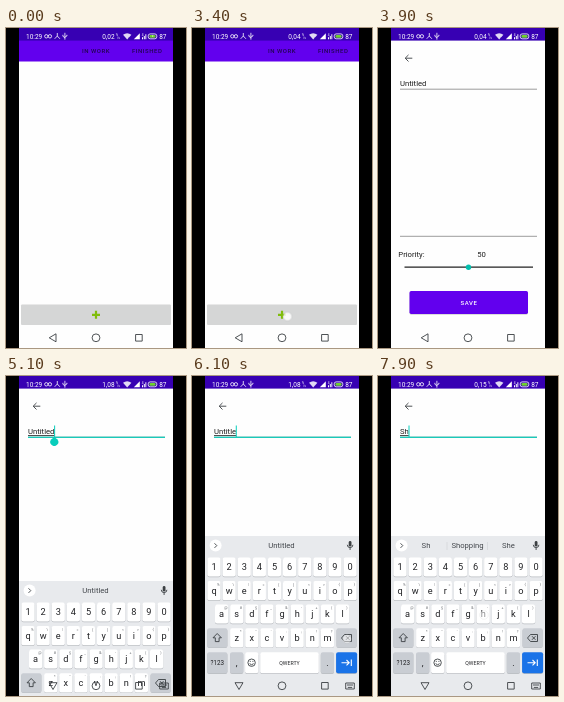
An HTML page that plays this animation: 180 px wide and 320 px high, repeating every 8000 ms.

```html
<!DOCTYPE html>
<html lang="en">
<head>
<meta charset="utf-8">
<title>To-do app</title>
<style>
html, body { margin: 0; width: 100%; height: 100%; overflow: hidden; background: #000; }
svg { display: block; width: 100%; height: 100%; font-family: Roboto, "Noto Sans", sans-serif; }
.mid { text-anchor: middle; }
.caps { font-size: 6px; font-weight: 500; letter-spacing: .089em; }
.body { font-size: 7.7px; fill: #1c1c1c; }
.key { font-size: 9.2px; fill: #202124; }
.hint { font-size: 3.6px; fill: #5f6368; }
.line { fill: none; stroke: #3c4043; stroke-width: .9; stroke-linejoin: round; }
.white { fill: none; stroke: #fff; stroke-width: .8; }

/* 1.25% = 100 ms */
#form, #keys, #touch, #focus, #drop, #caret, #back, #down, #arrow { animation: 8s step-end infinite; }
#form { animation-name: open; opacity: 0; }
@keyframes open {
  0% { opacity: 0; transform: translateY(20px); }
  45% { opacity: .25; transform: translateY(12px); }
  46.25% { opacity: .65; transform: translateY(5px); }
  47.5% { opacity: .92; transform: translateY(1.5px); }
  48.75%, 100% { opacity: 1; transform: none; }
}
#keys { animation-name: rise; }
@keyframes rise {
  0% { transform: translateY(170px); }
  63.75% { transform: translateY(45px); }
  65% { transform: translateY(10px); }
  66.25%, 100% { transform: none; }
}
#touch { animation-name: tap; opacity: 0; }
@keyframes tap {
  0% { opacity: 0; }
  42.5% { opacity: .85; transform: translate(95.5px, 288.5px); }
  45% { opacity: 0; }
  58.75% { opacity: .85; transform: translate(58px, 56px); }
  61.25% { opacity: 0; }
  70% { opacity: .5; transform: translate(155px, 263px); }
  87.5% { opacity: 0; }
  88.75% { opacity: .5; transform: translate(25px, 263px); }
  91.25% { opacity: 0; }
  92.5% { opacity: .5; transform: translate(45px, 239px); }
  95% { opacity: 0; }
  97.5%, 100% { opacity: .5; transform: translate(106px, 239px); }
}
#focus { animation-name: focus; }
@keyframes focus { 0% { opacity: 0; } 60%, 100% { opacity: 1; } }
#drop { animation-name: drop; }
@keyframes drop { 0% { opacity: 0; } 61.25% { opacity: 1; } 76.25%, 100% { opacity: 0; } }
#caret { animation-name: blink; }
@keyframes blink {
  0% { opacity: 1; } 67.5% { opacity: 0; } 73.75% { opacity: 1; }
  88.75% { opacity: 0; } 93.75%, 100% { opacity: 1; }
}
#back { animation-name: hide; }
#down { animation-name: show; }
@keyframes hide { 0% { opacity: 1; } 61.25%, 100% { opacity: 0; } }
@keyframes show { 0% { opacity: 0; } 61.25%, 100% { opacity: 1; } }
#arrow { animation-name: shift; fill: transparent; }
@keyframes shift { 0% { fill: transparent; } 90% { fill: #3c4043; } 93.75%, 100% { fill: transparent; } }
</style>
</head>
<body>
<svg viewBox="0 0 180 320">
  <defs><clipPath id="phone"><path d="M13 0h154v320h-154z"/></clipPath></defs>
  <rect width="180" height="320"/>
  <g clip-path="url(#phone)">
    <rect x="13" width="154" height="320" fill="#fefefe"/>

    <g id="list">
      <rect x="13" y="12" width="154" height="21.5" fill="#6200ee"/>
      <g class="caps" fill="#230452">
        <text x="76" y="25.3">IN WORK</text>
        <text x="126" y="25.3">FINISHED</text>
      </g>
      <rect x="15" y="276.5" width="150" height="20.5" rx="1" fill="#d5d6d6"/>
      <path d="M86 286.8h8M90 282.8v8" stroke="#80bd0c" stroke-width="2.2"/>
    </g>

    <g id="form">
      <rect x="13" y="12" width="154" height="287" fill="#fefefe"/>
      <path class="line" d="M34.3 30.2h-7M30.5 26.9l-3.3 3.3 3.3 3.3"/>
      <path d="M22 61.2h137M22 208.3h137" stroke="#858585" stroke-width=".8"/>
      <text id="field" class="body" x="22" y="58">Untitled</text>
      <g id="focus" fill="#08cdbb">
        <rect x="22" y="60.7" width="137" height="1.2"/>
        <rect id="caret" x="48" y="49.5" width="1" height="11.5"/>
      </g>
      <path id="drop" d="M48.3 61l2.9 2.2a4 4 0 1 1-5.8 0z" fill="#08cdbb"/>
      <text class="body" x="20.3" y="229">Priority:</text>
      <text class="body" x="99.2" y="229">50</text>
      <path d="M26.5 239.2h128.5" stroke="#222" stroke-width="1.2"/>
      <circle cx="90.5" cy="239.2" r="2.7" fill="#03bfae"/>
      <rect x="31.5" y="263.8" width="118.5" height="23" rx="1.7" fill="#000" opacity=".18"/>
      <rect x="31.5" y="263" width="118.5" height="23" rx="1.7" fill="#6200ee"/>
      <text class="caps mid" x="91" y="276.7" fill="#fff">SAVE</text>
    </g>

    <g id="keys">
      <rect x="13" y="160" width="154" height="165" fill="#e8eaed"/>
      <circle cx="23.6" cy="169.6" r="6" fill="#fff"/>
      <path class="line" d="M22.5 167.3l2.3 2.3-2.3 2.3"/>
      <path id="bars" d="M69 166v8M109.5 166v8" stroke="#cdd0d4" stroke-width=".6"/>
      <g id="words" class="mid" font-size="7.7" fill="#43474c">
        <text x="48" y="172.3"></text>
        <text x="89.5" y="172.3"></text>
        <text x="130.5" y="172.3"></text>
      </g>
      <rect x="156.7" y="165" width="2.8" height="5.6" rx="1.4" fill="#3c4043"/>
      <path class="line" d="M155.3 168.8a2.8 2.8 0 0 0 5.6 0M158.1 171.6v2.4"/>
      <g id="caps"></g>
      <path id="arrow" d="M25.2 257.5l4.2 4.3h-2.3v3.8h-3.8v-3.8h-2.3z" stroke="#3c4043" stroke-width=".9"/>
      <path class="line" d="M149.5 262l3-3.5h7v7h-7zM154 260.2l3.5 3.6M157.5 260.2l-3.5 3.6"/>
      <circle class="line" cx="59.6" cy="286.7" r="3.7"/>
      <path class="line" d="M57.6 287.6q2 2.4 4 0M58.3 284.9v1M60.9 284.9v1"/>
      <path d="M149.5 286.7h7.5M154.5 284l2.7 2.7-2.7 2.7M159.3 283.5v6.4" fill="none" stroke="#fff" stroke-width="1.1"/>
    </g>

    <g id="nav" class="line">
      <path id="back" d="M50 305.8v8l-6.8-4z"/>
      <g id="down">
        <path d="M43 306.7h8l-4 6.8z"/>
        <path d="M153.7 307h8.6v6h-8.6zM155 309h6M155.8 311.4h4.4"/>
      </g>
      <circle cx="90" cy="309.8" r="3.9"/>
      <rect x="129.6" y="306.5" width="6.6" height="6.6"/>
    </g>

    <rect x="13" width="154" height="12.6" fill="#3700b3"/>
    <g fill="#fff" font-size="6.5">
      <text x="20" y="10.6">10:29</text>
      <text id="rate" x="96.3" y="10.6">0,02</text>
      <text x="109.8" y="8" font-size="3.3">%</text>
      <text x="111" y="11" font-size="3.3">/s</text>
      <path d="M117 6.8q4.2-3 8.4 0l-4.2 4.6z" opacity=".85"/>
      <path d="M133.8 5.2v6h-6z"/>
      <text x="135.8" y="7.6" font-size="3.2">4</text>
      <path d="M136 11.2v-2h1v2zM137.8 11.2v-3.2h1v3.2zM139.4 11.2v-5h.9v5z"/>
      <text x="153.2" y="10.6">87</text>
    </g>
    <path id="link" d="M122.4 9.2h1.6v1.7h-1.6z" fill="#3700b3" opacity=".4"/>
    <g class="white">
      <circle cx="40.3" cy="8.3" r="1.7"/><circle cx="43.9" cy="8.3" r="1.7"/>
      <path d="M51.3 5v3l-2.6 2.8M51.3 8l2.6 2.8M58.9 4.8v6.8M56.9 6.8v1.5l2 1.4M60.9 6.8v1.2l-2 1.2"/>
      <rect x="142.2" y="5.9" width="8.6" height="4.9" rx="2"/>
    </g>
    <rect x="143.4" y="7" width="6.2" height="2.7" rx="1.2" fill="#6fd12d"/>
    <path id="bolt" d="M146 7.2h1.2v1.6h-1.2z" fill="#e6ffd6"/>

    <circle id="touch" r="4.3" fill="#fff" stroke="#777" stroke-opacity=".35" stroke-width=".5"/>
  </g>
</svg>
<script>
const $ = id => document.getElementById(id);
const NS = "http://www.w3.org/2000/svg";
const caps = $("caps"), letters = [];

function add(tag, attrs, text) {
  const el = document.createElementNS(NS, tag);
  for (const k in attrs) el.setAttribute(k, attrs[k]);
  if (text) el.textContent = text;
  return caps.appendChild(el);
}

function key(x, y, w, h, fill, label, hint, size) {
  const box = { x: x - w / 2, y: y - h / 2, width: w, height: h, rx: 2 };
  add("rect", { ...box, y: box.y + .7, fill: "#b9bcc1" });
  add("rect", { ...box, fill });
  if (hint) add("text", { x: x + 4.2, y: y - 4.7, class: "hint mid" }, hint);
  if (!label) return;
  const text = add("text", { x, y: y + (size ? size * .36 : 3.2), class: "key mid" }, label);
  if (size) text.style.fontSize = size + "px";
  if (/^[a-z]$/.test(label)) letters.push(text);
}

const PITCH = 15.12, GRAY = "#c9cdd3";
[
  ["1234567890", "", 22, 191],
  ["qwertyuiop", "%\\|=[]<>{}", 22, 214.6],
  ["asdfghjkl", "@#$_&-+()", 29.6, 238],
  ["zxcvbnm", "*\"':;!?", 44.7, 261.8]
].forEach(([row, hints, x, y]) =>
  [...row].forEach((c, i) => key(x + i * PITCH, y, 13.2, 19.2, "#fff", c, hints[i])));

key(25.3, 261.8, 20.2, 19.2, GRAY);
key(154.6, 261.8, 20.2, 19.2, GRAY);
key(25.3, 286.7, 20.2, 21, GRAY, "?123", "", 6.3);
key(44.7, 286.7, 13.2, 21, GRAY, ",");
key(59.7, 286.7, 13.2, 21, "#fff");
key(97.5, 286.7, 58.6, 21, "#fff", "QWERTY", "", 5.2);
key(135.4, 286.7, 13.2, 21, GRAY, ".");
key(154.6, 286.7, 21, 21, "#1a73e8");

// Each entry: start in ms, value
const typed = [[0, "Untitled"], [6100, "Untitle"], [6200, "Untit"], [6300, "Unti"], [6400, "Unt"],
  [6500, "U"], [6600, ""], [7500, "S"], [7900, "Sh"]];
const offers = [[0, " Untitled "], [6800, ""], [7500, "S So She"], [7900, "Sh Shopping She"]];
const rates = [[0, "0,02"], [1800, "0,04"], [4700, "1,08"], [7800, "0,15"]];
const links = [[0, .4], [500, 0], [2500, .4], [4500, 0]];

const at = (list, t) => list.filter(e => e[0] <= t).pop()[1];
const field = $("field"), words = $("words").children;

function put(el, text) {
  if (el.textContent !== text) el.textContent = text;
}

function draw(now) {
  const t = now % 8000;
  put(field, at(typed, t));
  field.style.textDecoration = t >= 4900 ? "underline" : "none";
  $("caret").setAttribute("x", 21.7 + (field.textContent ? field.getComputedTextLength() : 0));

  const offer = at(offers, t).split(" ");
  [...words].forEach((w, i) => put(w, offer[i] || ""));
  $("bars").style.opacity = offer[2] ? 1 : 0;

  put($("rate"), at(rates, t));
  $("link").style.opacity = at(links, t);
  $("bolt").style.opacity = t < 800 ? .7 : 0;

  const upper = t >= 7200 && t < 7500;
  letters.forEach(l => put(l, upper ? l.textContent.toUpperCase() : l.textContent.toLowerCase()));
  requestAnimationFrame(draw);
}

const start = performance.now();
const loop = () => draw(Math.max(0, performance.now() - start));
function drawNext() { loop(); }
const raf = window.requestAnimationFrame.bind(window);
window.requestAnimationFrame = () => raf(drawNext);
drawNext();
</script>
</body>
</html>
```
